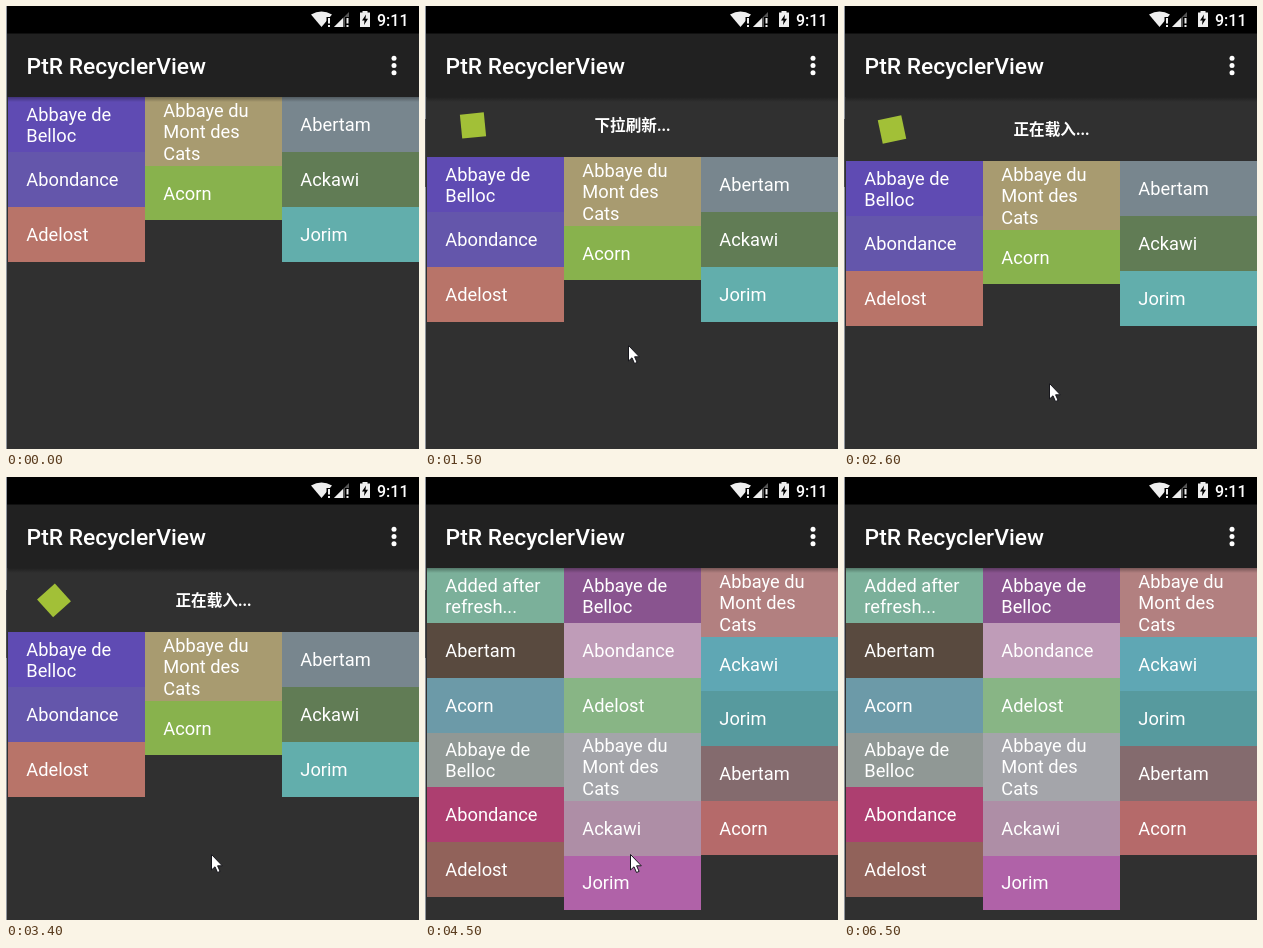
These frames come from a looping animation (413 px wide and 443 px high, 7.4 s). An HTML page with a canvas:

```html
<!DOCTYPE html>
<html lang="en">
<head>
<meta charset="utf-8">
<title>Pull to refresh</title>
<style>
  html, body { margin: 0; width: 100%; height: 100%; overflow: hidden; background: #303030; }
  canvas { display: block; width: 413px; height: 443px; }
</style>
</head>
<body>
<canvas id="stage" width="413" height="443"></canvas>
<script>
const ctx = document.getElementById('stage').getContext('2d');
const W = 413, H = 443, LOOP = 7400, STEP = 100;
const LEFT = 2, COL = 137, TOP = 91.4, ROW = 54.7, TALL = 68.3, LINE = 21.6;
const HEADER = 64, SANS = 'Roboto, sans-serif';

const belloc = ['Abbaye de', 'Belloc'];
const cats = ['Abbaye du', 'Mont des', 'Cats'];

const before = [
  [[belloc, '#5f4bb3'], [['Abondance'], '#6456ab'], [['Adelost'], '#b87469']],
  [[cats, '#a89b70'], [['Acorn'], '#88b24d']],
  [[['Abertam'], '#78868e'], [['Ackawi'], '#617c55'], [['Jorim'], '#62aeac']]
];
const after = [
  [[['Added after', 'refresh...'], '#7bb09a'], [['Abertam'], '#594a3f'], [['Acorn'], '#6c9aa8'],
   [belloc, '#909895'], [['Abondance'], '#ad3f70'], [['Adelost'], '#91625a']],
  [[belloc, '#89548f'], [['Abondance'], '#bf9cb8'], [['Adelost'], '#88b585'],
   [cats, '#a4a5aa'], [['Ackawi'], '#ae8ea6'], [['Jorim'], '#b062a8']],
  [[cats, '#b28080'], [['Ackawi'], '#5fa7b4'], [['Jorim'], '#579a9e'],
   [['Abertam'], '#846b6e'], [['Acorn'], '#b56a6a']]
];

// Keys are [time, ...values], joined by straight segments.
const pullKeys = [[800, 0], [900, 13], [1000, 25], [1500, 60], [1600, 65], [2100, 83],
  [2200, 83], [2300, 70], [2400, 64]];
const pointerKeys = [[100, 385, 113], [500, 203, 267], [800, 203, 264], [1000, 203, 283],
  [1500, 203, 339], [1600, 203, 347], [2100, 205, 377], [4800, 205, 377], [5100, 368, 165]];

function track(keys, t) {
  const next = keys.findIndex(k => k[0] >= t);
  if (next === 0) return keys[0].slice(1);
  if (next < 0) return keys[keys.length - 1].slice(1);
  const a = keys[next - 1], b = keys[next];
  const p = (t - a[0]) / (b[0] - a[0]);
  return a.slice(1).map((v, i) => v + (b[i + 1] - v) * p);
}

function pullAt(t) {
  if (t <= 4200) return track(pullKeys, t)[0];
  const rest = Math.max(0, 1 - (t - 4200) / 300);
  return HEADER * rest * rest;
}

function rect(x, y, w, h, color) {
  ctx.fillStyle = color;
  ctx.fillRect(x, y, w, h);
}

function poly(points, color) {
  ctx.beginPath();
  points.forEach(([x, y]) => ctx.lineTo(x, y));
  ctx.closePath();
  ctx.fillStyle = color;
  ctx.fill();
}

function label(str, x, y, font, align = 'left') {
  ctx.font = font;
  ctx.textAlign = align;
  ctx.fillStyle = '#fff';
  ctx.fillText(str, x, y);
}

function drawGrid(columns, offset) {
  columns.forEach((cells, c) => {
    const x = LEFT + c * COL;
    let y = TOP + offset;
    for (const [lines, color] of cells) {
      const h = lines.length > 2 ? TALL : ROW;
      const y0 = Math.round(y), y1 = Math.round(y + h);
      rect(x, y0, COL, y1 - y0, color);
      const base = y + h / 2 + 6.6 - (lines.length - 1) * LINE / 2;
      lines.forEach((s, i) => label(s, x + 18.3, base + i * LINE, '18.27px ' + SANS));
      y += h;
    }
  });
}

function drawHeader(t, offset) {
  const loading = t >= 2200;
  const y = TOP + offset - HEADER / 2;
  const angle = loading ? (t - 2640) * 0.3 : offset / HEADER * 90;
  ctx.save();
  ctx.translate(48, y);
  ctx.rotate(angle * Math.PI / 180);
  rect(-12, -12, 24, 24, '#a2c037');
  ctx.restore();
  const text = loading ? '正在载入...' : offset > HEADER ? '放开以刷新...' : '下拉刷新...';
  label(text, 207.5, y + 5.6, 'bold 15.6px Roboto, "Noto Sans CJK SC", "Noto Sans CJK", sans-serif', 'center');
}

function drawBars() {
  const shade = ctx.createLinearGradient(0, 91, 0, 96);
  shade.addColorStop(0, 'rgba(0,0,0,.32)');
  shade.addColorStop(1, 'rgba(0,0,0,0)');
  rect(LEFT, 91, W, 5, shade);
  rect(1, 0, W, 28, '#000');
  rect(1, 27.5, W, 63.5, '#212121');
  label('PtR RecyclerView', 20.5, 68, '500 22.8px ' + SANS);
  for (const y of [52.3, 59.5, 66.7]) {
    ctx.beginPath();
    ctx.arc(388, y, 2.5, 0, 7);
    ctx.fillStyle = '#fff';
    ctx.fill();
  }
  drawStatus();
}

function drawStatus() {
  // Wi-Fi wedge
  ctx.beginPath();
  ctx.moveTo(315.5, 21);
  ctx.lineTo(305, 8.6);
  ctx.quadraticCurveTo(315.5, 2.5, 326, 8.6);
  ctx.closePath();
  ctx.fillStyle = '#eee';
  ctx.fill();
  rect(320.5, 11, 6, 11, '#000');
  rect(322, 12, 2, 5.5, '#eee');
  rect(322, 19, 2, 2, '#eee');
  // Signal triangle
  poly([[328, 21], [343, 21], [343, 6]], '#555');
  poly([[328, 21], [337, 21], [337, 12]], '#eee');
  rect(339, 11, 4, 11, '#000');
  rect(340.5, 12, 2, 5.5, '#eee');
  rect(340.5, 19, 2, 2, '#eee');
  // Battery
  rect(356.5, 5, 5, 2, '#eee');
  rect(354, 6.5, 10, 14.5, '#eee');
  poly([[360, 8.5], [356, 14.5], [358.5, 14.5], [358, 19], [362, 12.8], [359.5, 12.8]], '#000');
  label('9:11', 402.5, 20, '500 16px ' + SANS, 'right');
}

function drawPointer(t) {
  if (t < 100 || t > 5100) return;
  const [x, y] = track(pointerKeys, t).map(Math.round);
  ctx.save();
  ctx.translate(x + 0.5, y + 0.5);
  poly([[0, 0], [0, 15.5], [3.5, 12.3], [6, 18], [8.6, 16.9], [6.1, 11.3], [10.8, 11.3]], '#fff');
  ctx.strokeStyle = '#16161c';
  ctx.lineWidth = 1;
  ctx.stroke();
  ctx.restore();
}

function draw(t) {
  const offset = pullAt(t);
  rect(0, 0, W, H, '#303030');
  if (offset > 0) drawHeader(t, offset);
  drawGrid(t < 4300 ? before : after, offset);
  drawBars();
  rect(0, 0, 1, H, '#8f949c');
  if (t >= 100 && t < 6500) rect(0, 113, 1, 68, '#4a4c50');
  drawPointer(t);
}

const start = performance.now();
function frame() {
  const t = (performance.now() - start) % LOOP;
  draw(Math.floor(t / STEP) * STEP);
  requestAnimationFrame(frame);
}
frame();
</script>
</body>
</html>
```
